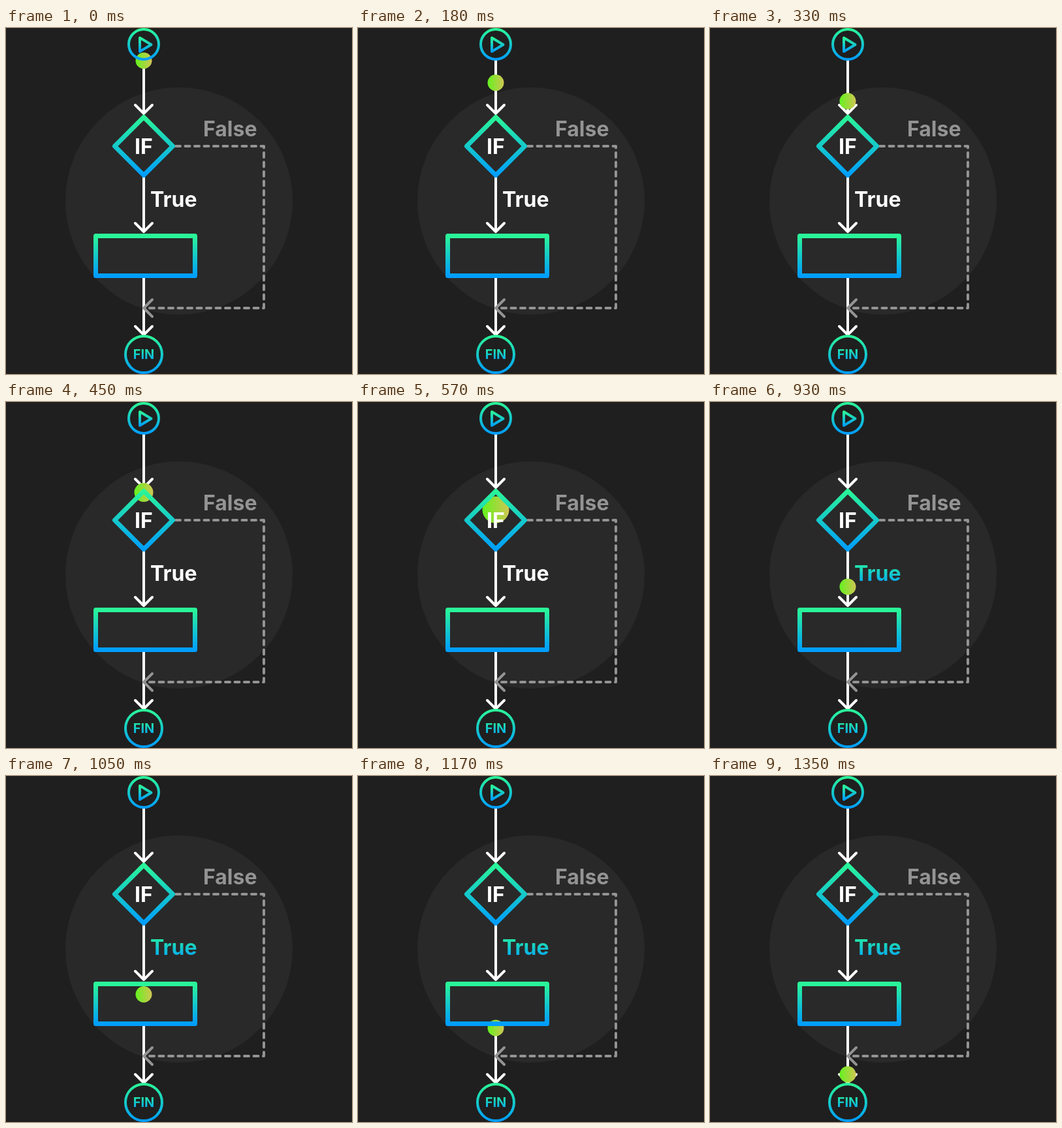
These frames come from a looping animation (530 px wide and 530 px high, 1.83 s). An HTML page:

```html
<!DOCTYPE html>
<html lang="en">
<head>
<meta charset="utf-8">
<title>If flowchart</title>
<style>
  html, body { margin: 0; width: 100%; height: 100%; overflow: hidden; background: #1f1f1f; }
  svg { display: block; width: 100vw; height: 100vh; }
  text { font: 700 32px Inter, sans-serif; }
  .line { fill: none; stroke: #fff; stroke-width: 4; stroke-linecap: round; stroke-linejoin: round; }
  .no { stroke: #949494; }
  .node { fill: none; stroke: url(#cool); stroke-width: 4; stroke-linejoin: round; }
  .thick { stroke-width: 7; }
</style>
</head>
<body>
<svg viewBox="0 0 530 530">
  <defs>
    <linearGradient id="cool" x2="0" y2="1">
      <stop stop-color="#2af598"/><stop offset="1" stop-color="#009efd"/>
    </linearGradient>
    <linearGradient id="lime">
      <stop stop-color="#64f21f"/><stop offset="1" stop-color="#d0c652"/>
    </linearGradient>
  </defs>

  <circle cx="265" cy="265" r="174" fill="#292929"/>

  <path class="line" d="M211 50V131M198 118L211 131L224 118"/>
  <path class="line" d="M211 229V312M198 299L211 312L224 299"/>
  <path class="line" d="M211 383V469M198 457L211 470L224 457"/>
  <path class="line no" stroke-dasharray="7 7.5" d="M260 181H395V429H213"/>
  <path class="line no" d="M224 416L211 429L224 442"/>
  <text x="302" y="166" fill="#949494">False</text>
  <text id="yes" x="221" y="274" fill="#fff">True</text>

  <circle id="ball" cx="211" fill="url(#lime)"/>

  <circle class="node" cx="211" cy="25" r="23"/>
  <path class="node" d="M205 15L222.500 25.500L205 36Z"/>
  <path class="node thick" d="M211 136.500L255.500 181L211 225.500L166.500 181Z"/>
  <rect class="node thick" x="137.500" y="318.500" width="152" height="61"/>
  <circle class="node" cx="211" cy="500" r="28"/>
  <text x="211" y="193" text-anchor="middle" fill="#fff">IF</text>
  <text x="211" y="507" text-anchor="middle" fill="url(#cool)" style="font-size:20px">FIN</text>
</svg>
<script>
  const LOOP = 1830, STEP = 30;
  const ball = document.getElementById('ball');
  const yes = document.getElementById('yes');

  // [time, value] pairs
  const height = [[0, 50], [330, 112], [570, 165], [780, 216], [930, 283], [1170, 386], [1350, 457]];
  const radius = [[420, 12.5], [540, 20.5], [780, 20.5], [900, 12.5]];

  function track(keys, t) {
    const i = keys.findIndex(([time]) => time > t);
    if (i === 0) return keys[0][1];
    if (i < 0) return keys[keys.length - 1][1];
    const [t0, a] = keys[i - 1], [t1, b] = keys[i];
    return a + (b - a) * (t - t0) / (t1 - t0);
  }

  function draw(now) {
    const t = Math.floor(now % LOOP / STEP) * STEP;
    ball.setAttribute('cy', track(height, t));
    ball.setAttribute('r', track(radius, t));
    yes.setAttribute('fill', t < 690 ? '#fff' : 'url(#cool)');
    requestAnimationFrame(() => draw(performance.now()));
  }
  draw(0);
</script>
</body>
</html>
```
